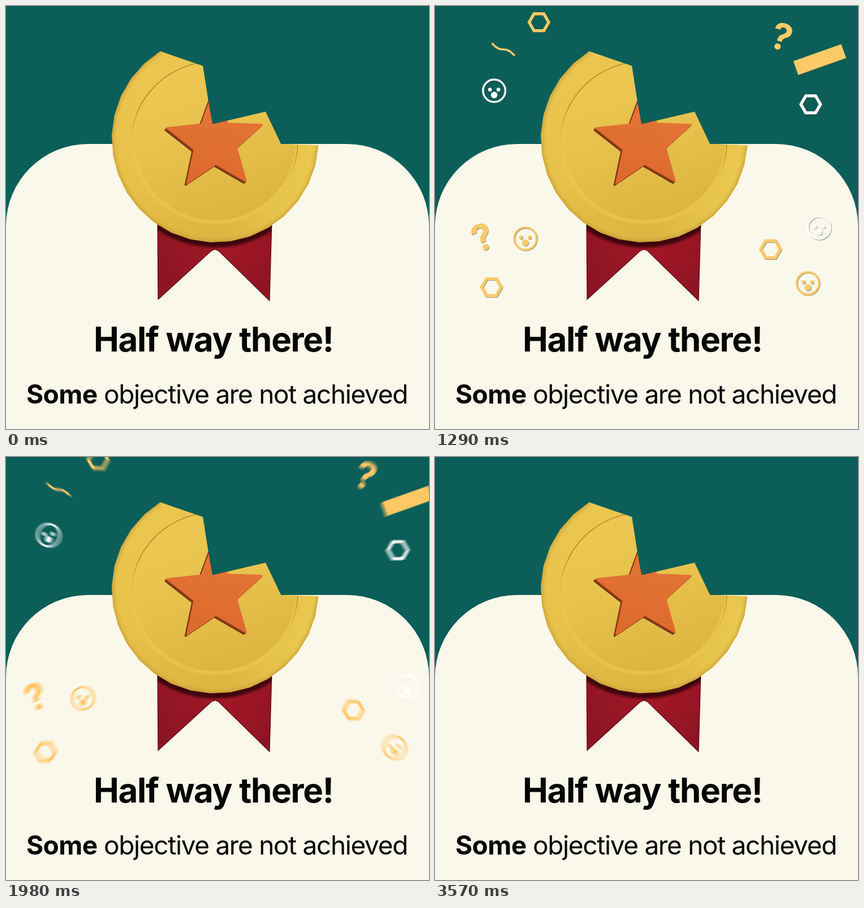
These frames come from a looping animation (748 px wide and 748 px high, 3.6 s). An HTML page with a canvas:

```html
<!DOCTYPE html>
<html lang="en">
<head>
<meta charset="utf-8">
<style>
  html, body { margin: 0; width: 100%; height: 100%; overflow: hidden; background: #0b5f58; }
  canvas { display: block; }
</style>
</head>
<body>
<canvas id="stage" width="748" height="748"></canvas>
<script>
const SIZE = 748, PERIOD = 1800, TURN = 1790, SHUTTER = 24, SAMPLES = 20;
const YELLOW = '#fcca68', WHITE = '#fff';
const BURST = { x: 388, y: 262 };
const DISC = { x: 370, y: 235, r: 183 };
const stage = document.getElementById('stage').getContext('2d');
const radians = degrees => degrees * Math.PI / 180;

function makeLayer() {
  const canvas = document.createElement('canvas');
  canvas.width = canvas.height = SIZE;
  return canvas.getContext('2d');
}

function trace(c, points) {
  c.beginPath();
  points.forEach(([x, y]) => c.lineTo(x, y));
}

function polygon(c, points) {
  trace(c, points);
  c.closePath();
}

// Points around a centre; radius may depend on the index
function around(x, y, count, radius, from, step) {
  return Array.from({ length: count }, (_, i) => {
    const a = radians(from + step * i), r = radius(i);
    return [x + r * Math.cos(a), y + r * Math.sin(a)];
  });
}

function disc(c, x, y, rx, ry = rx) {
  c.beginPath();
  c.ellipse(x, y, rx, ry, 0, 0, 2 * Math.PI);
}

function gradient(c, x0, y0, x1, y1, ...colors) {
  const g = c.createLinearGradient(x0, y0, x1, y1);
  colors.forEach((color, i) => g.addColorStop(i / (colors.length - 1), color));
  return g;
}

// Confetti shapes, drawn around their own centre
const shapes = {
  hex(c) {
    polygon(c, around(0, 0, 6, () => 17.3, 0, 60));
    c.lineWidth = 5.3;
    c.stroke();
  },
  face(c) {
    c.lineWidth = 3.4;
    disc(c, 0, 0, 19.8);
    c.stroke();
    for (const [x, y, r] of [[-7.5, -2, 3.4], [7.5, -2, 3.4], [0, 7.5, 5.8]]) {
      disc(c, x, y, r);
      c.fill();
    }
  },
  question(c) {
    c.font = '700 65px Inter, sans-serif';
    c.textAlign = 'center';
    c.fillText('?', 0, 24);
  },
  bar(c) {
    c.fillRect(-45, -13, 90, 26);
  },
  wave(c) {
    c.lineWidth = 3.6;
    c.beginPath();
    c.moveTo(-20, -11);
    c.bezierCurveTo(0, 11, 0, -11, 20, 11);
    c.stroke();
  }
};

// shape, colour, resting place, tilt in degrees
const confetti = [
  ['hex', YELLOW, 184, 29], ['wave', YELLOW, 121, 77], ['face', WHITE, 105, 150],
  ['question', YELLOW, 84, 408, -23], ['face', YELLOW, 160, 411], ['hex', YELLOW, 100, 497],
  ['question', YELLOW, 613, 54, 18], ['bar', YELLOW, 680, 95, -19.5], ['hex', WHITE, 664, 174],
  ['face', WHITE, 679, 392], ['hex', YELLOW, 593, 430], ['face', YELLOW, 659, 490]
];

// Damped spring: 0 = gathered behind the medal, 1 = at rest
function spread(ms) {
  const t = Math.max(0, ms - 20);
  return 1 - Math.exp(-0.014 * t) * Math.cos(0.01923 * t);
}

function drawConfetti(c, s) {
  for (const [shape, color, x, y, tilt = 0] of confetti) {
    c.save();
    c.translate(BURST.x + (x - BURST.x) * s, BURST.y + (y - BURST.y) * s);
    c.rotate(radians(tilt));
    c.fillStyle = c.strokeStyle = color;
    shapes[shape](c);
    c.restore();
  }
}

function drawCard(c) {
  c.fillStyle = '#0b5f58';
  c.fillRect(0, 0, SIZE, SIZE);
  c.fillStyle = '#faf8ea';
  c.beginPath();
  c.roundRect(0, 244, SIZE, 700, 145);
  c.fill();
  c.fillStyle = '#050505';
  const write = (text, x, y, font, spacing) => {
    c.font = font + ' Inter, sans-serif';
    c.letterSpacing = spacing;
    c.fillText(text, x, y);
  };
  write('Half way there!', 155, 611, '700 60px', '-1.3px');
  write('Some', 36, 703, '700 46px', '-0.5px');
  write('objective are not achieved', 173, 703, '400 46px', '-1.35px');
}

function drawRibbon(c) {
  const tail = (points, fill) => {
    polygon(c, points);
    c.fillStyle = fill;
    c.fill();
    c.strokeStyle = '#5a0a16';
    c.lineWidth = 1.2;
    c.stroke();
  };
  tail([[268, 380], [269, 519], [363, 433], [370, 430], [380, 380]],
    gradient(c, 268, 480, 370, 420, '#8c1422', '#a01827'));
  tail([[360, 380], [369, 430], [376, 433], [466, 521], [470, 380]],
    gradient(c, 370, 420, 470, 490, '#a61827', '#8e1423'));
  c.save();
  c.beginPath();
  c.rect(268, 380, 202, 50);
  c.clip();
  c.filter = 'blur(2px)';
  c.fillStyle = '#3d050d';
  disc(c, DISC.x, DISC.y + 9, DISC.r);
  c.fill();
  c.restore();
}

function drawStar(c) {
  const star = around(370, 240, 10, i => i % 2 ? 39 : 88, -92, 36);
  c.lineJoin = 'round';
  c.lineWidth = 3;
  for (let depth = 5; depth >= 0; depth--) {
    polygon(c, star.map(([x, y]) => [x - depth * .7, y + depth * .7]));
    c.fillStyle = c.strokeStyle = depth
      ? `hsl(18 70% ${40 - depth * 3}%)`
      : gradient(c, 380, 190, 350, 310, '#e37435', '#dd6a2d');
    c.fill();
    c.stroke();
  }
}

function drawMedal(c) {
  const { x, y, r } = DISC;
  const rim = around(x, y, 22, () => r, 3.5, 234.4 / 21);
  c.save();
  polygon(c, [...rim, [348, 106], [358, 170], [365, 209], [459, 187], [486, 244]]);
  c.clip();
  c.fillStyle = gradient(c, 250, 90, 400, 418, '#ebc650', '#e7c14a', '#dbb440');
  c.fillRect(x - r, y - r, 2 * r, 2 * r);
  c.fillStyle = gradient(c, 440, 250, 553, 290, '#eccb5200', '#eccb52');
  c.fillRect(x, y - r, r, 2 * r);

  // Rim shading and the raised ring
  c.filter = 'blur(3px)';
  c.strokeStyle = '#c39a35';
  c.lineWidth = 5;
  trace(c, rim);
  c.stroke();
  c.filter = 'blur(2px)';
  c.strokeStyle = '#eac651';
  disc(c, x, y + 3, 146, 144);
  c.stroke();
  c.filter = 'none';
  c.fillStyle = gradient(c, 300, 100, 385, 380, '#ecc853', '#e7c14c', '#dcb541');
  disc(c, x, y + 3, 143, 140);
  c.fill();
  c.strokeStyle = gradient(c, 500, 245, 480, 325, '#bf8a28', '#d9b04000');
  c.lineWidth = 1.6;
  disc(c, x - 1, y + 5, 147, 142);
  c.stroke();
  drawStar(c);
  c.restore();
}

const card = makeLayer(), medal = makeLayer(), blurred = makeLayer();
drawCard(card);
drawRibbon(medal);
drawMedal(medal);

function render(now) {
  const t = now % PERIOD;
  const ms = t < PERIOD / 2 ? t : TURN - t;
  const smear = spread(ms + SHUTTER / 2) - spread(ms - SHUTTER / 2);
  stage.drawImage(card.canvas, 0, 0);
  if (Math.abs(smear) < .008) {
    stage.save();
    stage.shadowColor = '#4a4530a0';
    stage.shadowOffsetX = stage.shadowOffsetY = .8;
    drawConfetti(stage, spread(ms));
    stage.restore();
  } else {
    blurred.clearRect(0, 0, SIZE, SIZE);
    blurred.globalCompositeOperation = 'lighter';
    blurred.globalAlpha = 1 / SAMPLES;
    // Motion blur; the shutter stays shut while everything is gathered
    for (let i = 0; i < SAMPLES && ms > 20; i++)
      drawConfetti(blurred, spread(ms + SHUTTER * ((i + .5) / SAMPLES - .5)));
    stage.drawImage(blurred.canvas, 0, 0);
  }
  stage.drawImage(medal.canvas, 0, 0);
}

function tick() {
  render(performance.now());
  requestAnimationFrame(tick);
}
tick();
</script>
</body>
</html>
```
